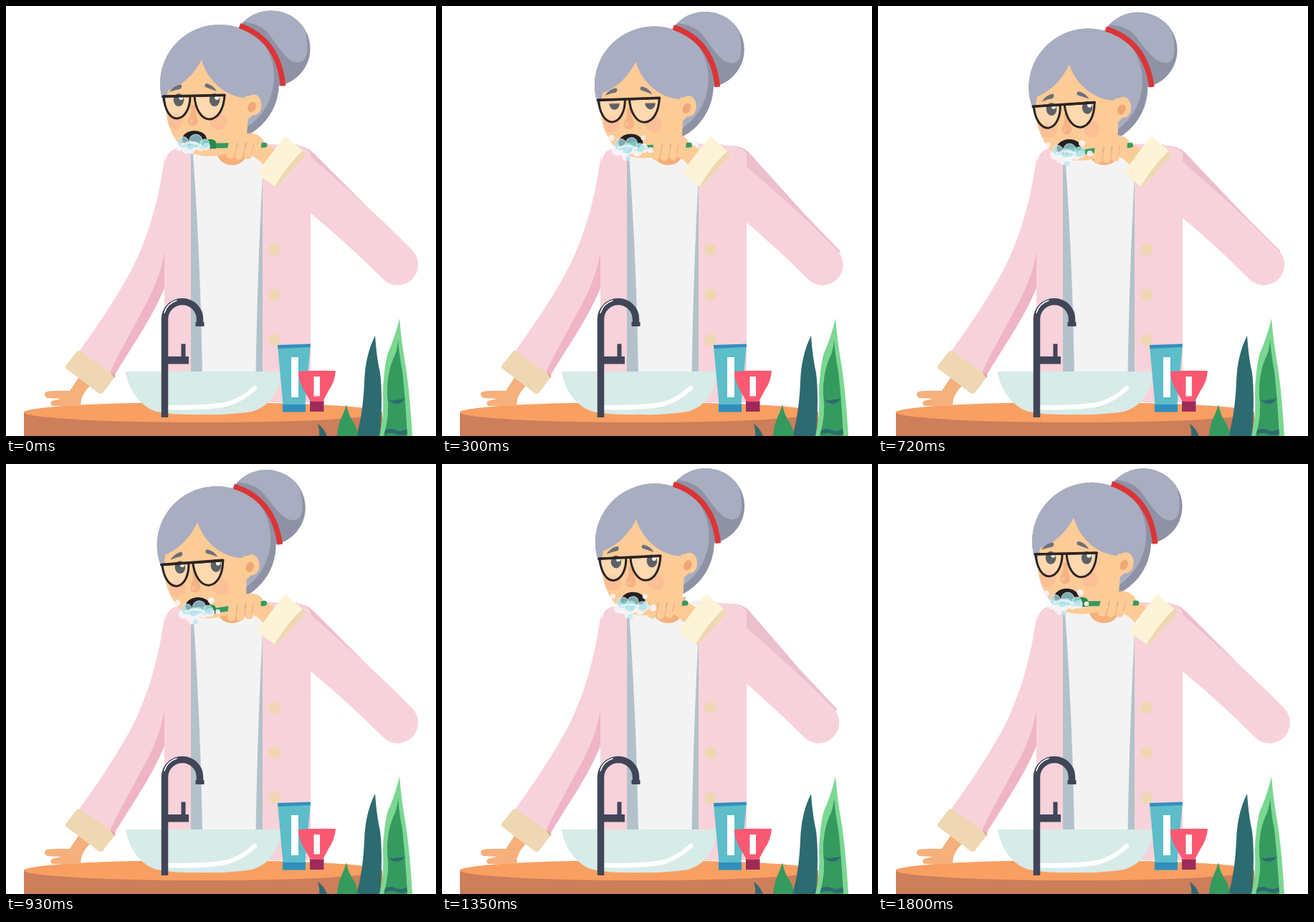
Recreate the animation shown at these times as an HTML page with a canvas. Size 600 by 600 pixels, loop 1830 ms.

```html
<!DOCTYPE html>
<html lang="en">
<head>
<meta charset="utf-8">
<title>Brushing teeth</title>
<style>
html, body { margin: 0; width: 100%; height: 100%; overflow: hidden; background: #fff; }
canvas { display: block; width: 600px; height: 600px; }
</style>
</head>
<body>
<canvas id="stage"></canvas>
<script>
const LOOP = 1830;
const canvas = document.getElementById('stage');
const ctx = canvas.getContext('2d');
const dpr = window.devicePixelRatio || 1;
canvas.width = canvas.height = 600 * dpr;

const C = {
  pink: '#f8d2da', pinkDark: '#ecbfcd', fold: '#efb5c6', skin: '#fdcb96', skinDark: '#f5b07b',
  hair: '#a8adc1', hairDark: '#8f92a5', red: '#dc3436', ink: '#2b2423', metal: '#414558',
  cream: '#fdf4d8', creamDark: '#eed7b2', green: '#349a5e', greenDark: '#298650', teal: '#2d6b70'
};

// Smooth 0..1..0 swing, starting "lead" ms into its cycle
const swing = (t, lead = 0, period = LOOP) =>
  (1 - Math.cos(2 * Math.PI * (t + lead) / period)) / 2;
const clamp = v => Math.max(0, Math.min(1, v));

function fill(d, color) {
  ctx.fillStyle = color;
  ctx.fill(new Path2D(d));
}
function line(d, color, width, cap = 'round') {
  ctx.strokeStyle = color;
  ctx.lineWidth = width;
  ctx.lineCap = cap;
  ctx.lineJoin = 'round';
  ctx.stroke(new Path2D(d));
}
function oval(x, y, rx, ry, color) {
  ctx.fillStyle = color;
  ctx.beginPath();
  ctx.ellipse(x, y, rx, ry, 0, 0, 7);
  ctx.fill();
}
const disc = (x, y, r, color) => oval(x, y, r, r, color);
function rect(x, y, w, h, color) {
  ctx.fillStyle = color;
  ctx.fillRect(x, y, w, h);
}
function group(draw) {
  ctx.save();
  draw();
  ctx.restore();
}
function clipOval(x, y, rx, ry) {
  ctx.beginPath();
  ctx.ellipse(x, y, rx, ry, 0, 0, 7);
  ctx.clip();
}
function rotateAt(x, y, a) {
  ctx.translate(x, y);
  ctx.rotate(a);
  ctx.translate(-x, -y);
}

function drawBody() {
  // resting arm
  fill('M222 208C214 262 205 302 183 352C164 393 128 446 102 482L151 515C178 471 205 434 222 390Z', C.pink);
  fill('M222 335C218 372 204 401 186 433C171 461 156 488 146 509L151 516C178 471 205 434 222 391Z', C.fold);
  // shirt and jacket
  fill('M259 206L300 200L358 189V515H262Z', '#f3f3f3');
  fill('M221 230Q221 199 243 198L260 198V545H221Z', C.pink);
  fill('M358 192L403 195Q418 196 425 205V553H358Z', C.pink);
  fill('M258 205L261 207C268 310 272 400 274 515H258Z', '#b3c2ca');
  fill('M358 236V515H348.500C350 420 353 330 358 236Z', '#b3c2ca');
  for (const y of [340, 403, 466]) disc(374.5, y, 8.5, C.creamDark);
  // neck
  fill('M292 198C294 213 302 222 315 222C326 222 332 217 337 207L340 185Z', C.skinDark);
}

function drawUpperArm(dx) {
  fill(`M400 195Q418 194 428 204L${520 + dx * 0.9} ${296 + dx * 0.35}L${568 + dx * 0.8} 342L${548 + dx} 372L425 262Z`, C.pinkDark);
}

function drawForearm(dx) {
  group(() => {
    ctx.translate(dx, 0);
    fill('M405 192L418 204C470 250 524 296 567 341A28.600 28.600 0 0 1 526 381C492 347 460 318 425 289L377 250Z', C.pink);
  });
}

function drawCuff(dx) {
  group(() => {
    ctx.translate(dx, 0);
    fill('M388 183Q390 181 392 183L417 205Q419 208 417 210L379 251Q376 253 374 251L353 236Q350 233 352 230Z', C.cream);
    fill('M414 202L417 205Q419 208 417 210L379 251Q377 253 375 251Q394 220 414 202Z', C.creamDark);
  });
}

function headPose(t) {
  const s = (swing(t, 150) - 0.065) / 0.9;
  ctx.translate(-4.4 * s, 5.2 * s);
  rotateAt(300, 110, -0.049 * swing(t, 20));
}
const facePose = t => ctx.translate(4.8 * swing(t, 20), 5.6 * swing(t, 30));

function drawHair() {
  group(() => {
    clipOval(370, 59.5, 54.5, 53);
    rect(310, 0, 120, 120, C.hairDark);
    fill('M330 17L345 0H408Q417 26 420 48Q422 70 415 76Q408 82 396 75C384 66 375 49 365 37Q353 24 330 22Z', C.hair);
  });
  group(() => {
    clipOval(298, 108, 83, 82);
    rect(210, 20, 180, 175, C.hairDark);
    oval(289, 99, 85, 84, C.hair);
  });
  line('M326 27.500C362 40 382.500 68 386.500 111.500', C.red, 7.5, 'butt');
}

const FACE = 'M273 75C264 92 249 110 226 118L223 132C222 158 229 178 242 194C254 207 272 210 288 209.500' +
  'C313 208 331 198 336 180L340 128C312 130 282 108 273 75Z';

function drawEye(x, y, shut) {
  group(() => {
    const top = y - 9 + 18 * shut;
    ctx.beginPath();
    ctx.rect(x - 10, top, 20, y + 10 - top);
    ctx.clip();
    oval(x, y, 7.3, 9, '#5c6166');
    disc(x + 3.2, y - 3, 3, '#f4f0ea');
  });
  if (shut > 0.1) line(`M${x - 7} ${y - 9 + 18 * shut}h14`, '#d69c70', 1.2);
}

function drawHead(t) {
  headPose(t);
  drawHair();
  fill(FACE, C.skin);
  oval(346, 138, 10.5, 14.5, C.skin);
  fill('M334 126L347 124L346 151L334 161Z', C.skin);
  group(() => {
    ctx.translate(343, 141);
    ctx.rotate(0.45);
    oval(0, 0, 5.5, 7.5, '#efa875');
  });

  group(() => {
    ctx.clip(new Path2D(FACE));
    facePose(t);
    disc(236, 160, 11.5, 'rgba(249,172,148,.42)');
    disc(296, 161, 11.5, 'rgba(249,172,148,.42)');
    fill('M258 138Q260 148 254 159Q253 167 261 167.500Q268 167 268 159Q264 149 264 138Z', '#f5b283');
    disc(258, 161, 3, '#f8bd91');
    oval(263, 186, 17, 12, '#231f20');
  });

  // lenses tint the skin, eyes sit above
  const glassesPose = () => ctx.translate(0.9 * swing(t), 5.6 * swing(t, 30));
  const left = 'M220 126C221 143 228 157 239 157C250 156 257 142 257 125.500Z';
  const right = 'M263 125.500C264 143 272 158 284 158C297 157 304 142 305 124.500Z';
  group(() => {
    glassesPose();
    fill(left, 'rgba(255,255,255,.24)');
    fill(right, 'rgba(255,255,255,.24)');
  });
  group(() => {
    facePose(t);
    const shut = clamp(1 - Math.abs(t - 360) / 120);
    drawEye(241, 131, shut);
    drawEye(291, 131, shut);
    fill('M228 120Q234 111 244 109.500Q247 113 243 116Q236 117 228 120Z', '#6d7078');
    fill('M294 119Q290 111 280 108Q276 109 278 113Q286 116 294 119Z', '#6d7078');
  });
  group(() => {
    glassesPose();
    line(left, C.ink, 3);
    line(right, C.ink, 3);
    line('M219 126.200L305 124.200', C.ink, 3.6);
  });
}

function drawHand(t, dx) {
  ctx.translate(dx, 0);
  fill('M343 186L362 192L380 203L364 226L350 213L336 205Z', C.skin);
  rotateAt(362, 197, -0.14 * swing(t, 60));
  fill('M309 196Q314 186 326 182Q338 175 349 179Q360 183 361 195L354 207Q330 212 310 204Z', C.skin);
  line('M282 195L361 194', C.green, 7);
  fill('M268 190Q270 186 287 186Q293 187 293 191V199H272Q268 198 268 194Z', C.greenDark);
  // fingers wrap the handle
  const tips = [[317, 313, 207], [329, 325, 208.5], [341, 337.5, 208], [351, 348.5, 205]];
  for (const [x, tx, ty] of tips) line(`M${x} 190L${tx} ${ty}`, C.skin, 11.5);
  for (const [x, tx, ty] of tips.slice(1)) line(`M${x - 5.5} 192L${tx - 6} ${ty}`, '#eeb383', 1.2);
}

const WHITES = [[243, 196, 7], [252, 199, 7.5], [262, 196, 7.5], [272, 198, 6.5], [280, 195, 6], [257, 202, 5]];
const BLUES = [[248, 189, 7.5], [264, 188, 8.5], [277, 193, 6.5], [258, 194, 6.5]];
const DROPS = [[235, 180, 4], [281, 180, 4], [291, 196, 4], [254, 207, 3.5]];

function drawFoam(t) {
  headPose(t);
  facePose(t);
  const grow = clamp(t / 180);
  const wob = (i, lead) => (swing(t, lead + i * 271, LOOP / 2) - 0.5) * 2;
  const each = (list, lead, draw) => list.forEach(([x, y, r], i) =>
    draw(x + wob(i, lead), y + wob(i, lead + 300), r + 0.7 * wob(i, lead + 120)));

  each(WHITES, 0, (x, y, r) => disc(x, y, r * (0.85 + 0.15 * grow), 'rgba(246,246,252,.86)'));
  each(BLUES, 90, (x, y, r) => {
    disc(x, y, r, 'rgba(166,225,234,.72)');
    ctx.strokeStyle = 'rgba(222,246,250,.7)';
    ctx.lineWidth = 1;
    ctx.stroke();
  });
  line('M246 193Q259 188 271 194', 'rgba(255,255,255,.6)', 3);
  each(DROPS, 200, (x, y, r) => disc(x, y, r * grow, 'rgba(250,242,246,.9)'));
  disc(259, 208, 3.5 * grow, 'rgba(190,232,240,.85)');
}

function drawRestingHand() {
  fill('M103 516L118 529Q108 539 105 549L104 558H65Q60 555 64 551L77 548L58 547Q52 544 55 539Q59 536 89 537Z', C.skinDark);
  fill('M99 482Q101 480 104 482L150 514Q153 516 151 519L135 540Q132 542 129 540L84 506Q81 504 84 501Z', C.creamDark);
  fill('M145 510L151 514Q154 516 151 519Z', '#dda79c');
}

function drawCounter() {
  rect(25, 567, 500, 33, '#cd7e5b');
  oval(275, 567, 250, 14, '#f99f62');
  drawRestingHand();

  fill('M167 510H384C383 534 369 559 343 566Q311 571 276 570Q222 571 205 564C184 555 170 532 167 510Z', '#d7ebe8');
  line('M224 560Q287 561 310 555Q330 549 347 533', '#fff', 6.5);

  line('M221.500 574V437A24.500 24.500 0 0 1 270.500 437V444', C.metal, 9.5, 'butt');
  rect(264.5, 441, 12, 6, C.metal);
  rect(224, 489, 31, 10.5, C.metal);
  rect(244.500, 471.500, 6, 19, C.metal);
  line('M221 428Q225 415 238 411', '#fff', 1.5);

  // tubes
  rect(386, 555, 32, 11.500, '#2f8fbd');
  fill('M379 474L425 472L417.500 556H386.500Z', '#5dbdc9');
  fill('M379 473L425 471.500L424.500 476L379.500 478Z', '#348fbd');
  rect(398, 490, 10, 56, '#fff');
  rect(424, 551, 19.500, 15, '#9c2b5a');
  fill('M408 510Q434 508 460 509Q459 524 450 537L442 552H425L417 538Q408 524 408 510Z', '#fb5972');
  rect(429.500, 517, 8.500, 27.500, '#fff');
}

function drawPlant() {
  fill('M489 600Q498 570 500 525Q501 488 515 460Q517 490 522 512Q526 545 522 600Z', C.teal);
  fill('M521 600Q528 572 526 540Q527 505 533 484Q543 462 549 436Q552 470 557 498Q563 535 567 600Z', '#7bd792');
  fill('M527 600Q536 570 532 542Q531 515 540 493Q546 482 547 466Q549 490 553 510Q557 545 560 600Z', C.green);
  fill('M532 547Q539 553 545 549Q551 550 557 547Q552 555 545 555Q538 555 532 547Z', C.teal);
  fill('M529 592Q537 588 544 592Q552 595 559 590L560 597Q552 600 544 597Q537 594 528 598Z', C.teal);
  fill('M462 600Q463 585 469 572Q473 564 475 556Q478 572 485 581Q490 589 491 600Z', C.green);
  fill('M435 583Q443 588 448 600H437Q438 592 435 583Z', C.teal);
}

function draw(t) {
  const arm = -21 * swing(t, 0, LOOP / 2);
  ctx.setTransform(dpr, 0, 0, dpr, 0, 0);
  rect(0, 0, 600, 600, '#fff');
  drawUpperArm(arm);
  drawBody();
  drawForearm(arm);
  group(() => drawHead(t));
  group(() => drawHand(t, arm));
  group(() => drawFoam(t));
  drawCuff(arm);
  drawCounter();
  drawPlant();
}

const start = performance.now();
function tick() {
  draw((performance.now() - start) % LOOP);
  requestAnimationFrame(tick);
}
tick();
</script>
</body>
</html>
```
